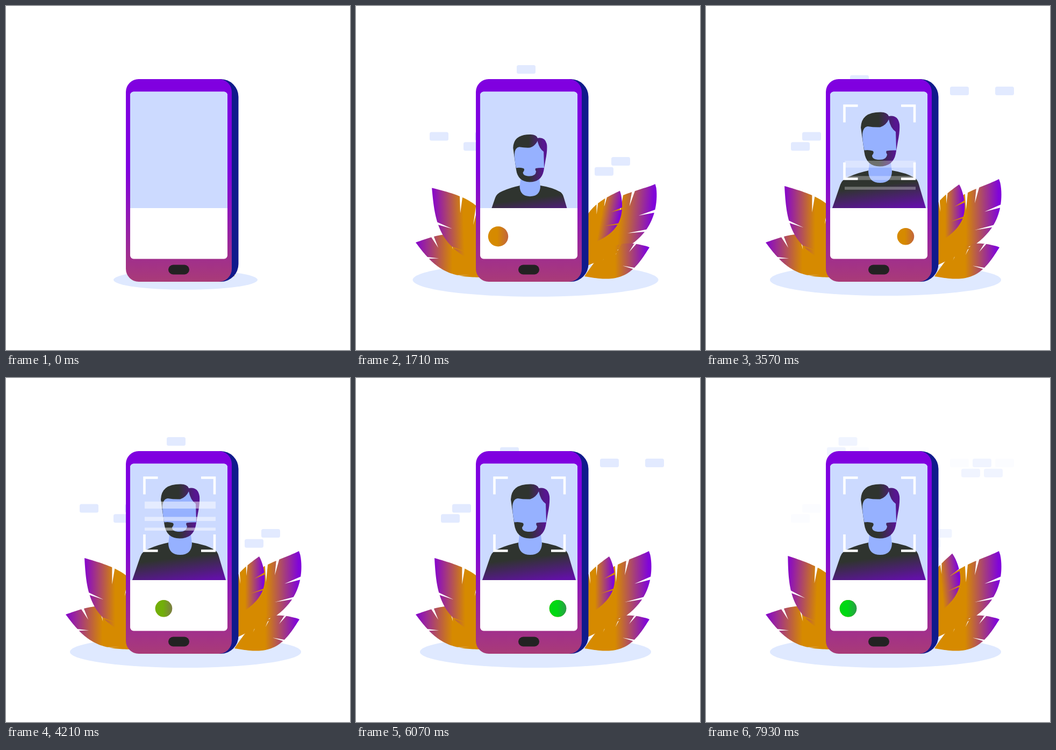
An HTML page for the animation above (8 s loop, 640 px wide and 640 px high).

```html
<!DOCTYPE html>
<html lang="en">
<head>
<meta charset="utf-8">
<title>Face scan</title>
<style>
html, body { margin: 0; width: 100%; height: 100%; overflow: hidden; background: #fff; }
svg { display: block; width: 100vw; height: 100vh; }
</style>
</head>
<body>
<svg viewBox="0 0 640 640">
  <defs>
    <linearGradient id="body" gradientUnits="userSpaceOnUse" x1="0" y1="300" x2="0" y2="513">
      <stop stop-color="#8000e0"/><stop offset="1" stop-color="#a93b77"/>
    </linearGradient>
    <linearGradient id="hair" gradientUnits="userSpaceOnUse" x1="321" y1="0" x2="352" y2="0">
      <stop stop-color="#2f342f"/><stop offset="1" stop-color="#561690"/>
    </linearGradient>
    <linearGradient id="shirt" gradientUnits="userSpaceOnUse" x1="320" y1="334" x2="326" y2="381">
      <stop stop-color="#2f342f"/><stop offset="1" stop-color="#6210a6"/>
    </linearGradient>
    <linearGradient id="leftLeaf">
      <stop offset=".02" stop-color="#8808c8"/><stop offset=".53" stop-color="#d68a00"/>
    </linearGradient>
    <linearGradient id="rightLeaf" x1="1" x2="0">
      <stop offset=".04" stop-color="#8004da"/><stop offset=".53" stop-color="#d68a00"/>
    </linearGradient>
    <linearGradient id="orange">
      <stop offset=".45" stop-color="#d68a00"/><stop offset="1" stop-color="#c2653f"/>
    </linearGradient>
    <linearGradient id="green">
      <stop offset=".45" stop-color="#00d813"/><stop offset="1" stop-color="#2c9c4c"/>
    </linearGradient>
    <clipPath id="view"><rect x="231" y="159.500" width="181" height="216.500"/></clipPath>
  </defs>

  <ellipse id="shadow" cx="334" cy="509.500" fill="#dfe9ff"/>
  <g id="bricks" fill="#dfe8ff"></g>
  <g id="leaves"></g>

  <rect x="300" y="136" width="132.500" height="377" rx="33" fill="#101a8c"/>
  <rect x="223" y="136" width="197" height="377" rx="24" fill="url(#body)"/>
  <rect x="231" y="159.500" width="181" height="311" rx="6.500" fill="#fff"/>
  <path d="M231 376V166A6.500 6.500 0 0 1 237.500 159.500H405.500A6.500 6.500 0 0 1 412 166V376Z" fill="#ccdaff"/>
  <rect x="302" y="481.500" width="39" height="18" rx="9" fill="#222"/>

  <g clip-path="url(#view)">
    <g id="person">
      <path d="M213 440L250 332Q253 323 265 318Q283 310 303 306H346Q372 310 389 320Q394 324 396 332L428 440Z" fill="url(#shirt)"/>
      <path d="M305 285L302 308Q303 329 324 329Q345 329 346 308L343 285Z" fill="#96b1ff"/>
      <path d="M288 226Q289 197.500 324 197.500Q337 197 340 205Q357 202 360 220Q361 233 357 252L353 275Q348 298.500 323 298.500Q298 298 294.500 272Z" fill="url(#hair)"/>
      <path d="M291 239Q292 225 301 224Q313 226 324 225.500Q335 222 340 211Q343 227 353 234L354 268.500Q344 268 336 269.500Q334 272 337 276Q336 286 323 286Q309 286 309 278Q314 272 310 269.500Q302 267 294.500 268.500Q291 252 291 239Z" fill="#96b1ff"/>
    </g>
  </g>
  <g id="scan" fill="#fff" fill-opacity=".5">
    <rect x="258" y="230" width="132" height="13"/>
    <rect x="258" y="258.500" width="132" height="7.500"/>
    <rect x="258" y="278.500" width="132" height="5.500"/>
  </g>
  <path id="frame" d="M257.500 216.500V185.500H282.500M363 185.500H388V216.500M257.500 291V321.500H282.500M363 321.500H388V291" fill="none" stroke="#fff" stroke-width="4.500"/>
  <circle id="dot" cy="428.800" fill="url(#orange)"/>
  <circle id="done" cy="428.800" fill="url(#green)"/>
</svg>
<script>
const LOOP = 8000;
const byId = id => document.getElementById(id);

function set(node, attrs) {
  for (const key in attrs) node.setAttribute(key, attrs[key]);
}

function add(parent, tag, attrs) {
  const node = document.createElementNS("http://www.w3.org/2000/svg", tag);
  set(node, attrs);
  return parent.appendChild(node);
}

const progress = (t, start, end) => Math.min(1, Math.max(0, (t - start) / (end - start)));

// Back-out easing from 0 to 1; a higher bounce overshoots more, -1 is a plain ease-out.
function settle(t, start, end, bounce) {
  const rest = 1 - progress(t, start, end);
  return 1 - rest * rest * ((bounce + 1) * rest - bounce);
}

// A sine-shaped blade between tip and pivot, slit towards its rib on both sides.
function leafPath([px, py], [tx, ty], left, right) {
  const ax = px - tx, ay = py - ty, length = Math.hypot(ax, ay);
  const point = (x, off) => [tx + ax * x - ay / length * off, ty + ay * x + ax / length * off];
  const side = (sign, { width, skew = 1, cuts }) => {
    const edge = x => sign * width * Math.sin(Math.PI * x ** skew);
    const points = [], step = 0.02;
    for (let i = 0; i <= 50; i++) {
      const x = i * step;
      points.push(point(x, edge(x)));
      const cut = cuts.find(c => c >= x && c < x + step);
      if (cut) {
        points.push(point(cut, edge(cut)), point(cut + .14, edge(cut) * .47),
          point(cut + .025, edge(cut + .025)));
      }
    }
    return points;
  };
  return "M" + [...side(1, left), ...side(-1, right).reverse()].join("L") + "Z";
}

const leaves = [
  { pivot: [240, 505], tip: [111, 440], from: 80, start: 60, end: 1500, bounce: 2.85,
    left: { width: 22.5, cuts: [.22, .36, .67] }, right: { width: 48, cuts: [.15, .33] } },
  { pivot: [250, 490], tip: [146, 335], from: 80, start: 0, end: 2000, bounce: 1.45, drift: 2.3,
    left: { width: 35, cuts: [.12, .31, .59] }, right: { width: 50, cuts: [.23, .4] } },
  { pivot: [425, 485], tip: [545, 322], from: -59, start: 200, end: 2500, bounce: 1.45,
    left: { width: 47, skew: 1.1, cuts: [.17, .27, .6] }, right: { width: 43, skew: .8, cuts: [.18, .37, .61] } },
  { pivot: [425, 503], tip: [546, 449], from: -100, start: 60, end: 1500, bounce: 1.6,
    left: { width: 29, skew: .9, cuts: [.15, .34, .53] }, right: { width: 28, cuts: [.31, .58] } },
  { pivot: [413, 452], tip: [471, 332], from: -40, start: 850, end: 2500, bounce: 3, drift: -6,
    left: { width: 23, cuts: [.18, .32] }, right: { width: 33.5, skew: .85, cuts: [.17, .38] } }
];
for (const leaf of leaves) {
  const { pivot, tip, left, right } = leaf;
  leaf.node = add(byId("leaves"), "g", {});
  add(leaf.node, "path", {
    d: leafPath(pivot, tip, left, right),
    fill: tip[0] < pivot[0] ? "url(#leftLeaf)" : "url(#rightLeaf)"
  });
}

// Bricks blink in three groups that share one period.
const BLINK = 2500;
const groups = { a: { peak: 1710, level: .9 }, b: { peak: 1000, level: .9 }, c: { peak: 300, level: .5 } };
const bricks = [];
function brickRow(x, y, names, pitch = 42) {
  [...names].forEach((name, i) => bricks.push({
    group: groups[name],
    node: add(byId("bricks"), "rect", { x: x + i * pitch, y, width: 35, height: 16, rx: 3.5 })
  }));
}
function wall(x, y, upper, lower) {
  brickRow(x, y, upper);
  brickRow(x + 21, y + 18.7, lower);
}
function stack(x, y, upper, lower) {
  brickRow(x + 21.5, y, upper, 52.5);
  brickRow(x, y + 18.8, lower, 43);
}
wall(137, 234.5, "aba", "ba");
wall(454, 150, "bcb", "cc");
stack(225, 110, "ca", "cb");
stack(401, 281, "ca", "ca");

function draw(t) {
  const rx = 134 + 81 * settle(t, 40, 2200, 4.5);
  set(byId("shadow"), { rx, ry: rx * .137 });

  for (const { node, group } of bricks) {
    const wave = Math.cos((t - group.peak) / BLINK * 2 * Math.PI);
    set(node, { opacity: group.level * Math.max(0, wave) * progress(t, 0, 1700) });
  }

  for (const { node, pivot, from, start, end, bounce, drift = 0 } of leaves) {
    const angle = from * (1 - settle(t, start, end, bounce)) + drift * progress(t, 6900, 7930) ** 2;
    set(node, { transform: `rotate(${angle} ${pivot})` });
  }

  const size = .45 + .55 * settle(t, 900, 2450, -1);
  set(byId("person"), { transform: `translate(322 530) scale(${size}) translate(-322 -530)` });

  const spread = settle(t, 2250, 2880, -1);
  set(byId("frame"), {
    transform: `translate(322.75 0) scale(${spread} 1) translate(-322.75 0)`,
    opacity: Math.min(1, spread * 1.5)
  });

  set(byId("scan"), {
    transform: `translate(0 ${20 + 40 * Math.cos((t - 3450) / 2280 * 2 * Math.PI)})`,
    opacity: progress(t, 3450, 3650) - progress(t, 5500, 5800)
  });

  // Three sweeps, a short rest on the right, then one sweep back.
  const sweeps = 3 * progress(t, 2232, 5811) + progress(t, 6130, 7330);
  const dot = { cx: 320 - 55.5 * Math.cos(Math.PI * sweeps), r: 15.8 * settle(t, 1350, 2000, 2.5) };
  set(byId("dot"), dot);
  set(byId("done"), { ...dot, opacity: progress(t, 3600, 4900) });
}

const start = performance.now();
function tick() {
  draw((performance.now() - start) % LOOP);
  requestAnimationFrame(tick);
}
tick();
</script>
</body>
</html>
```
